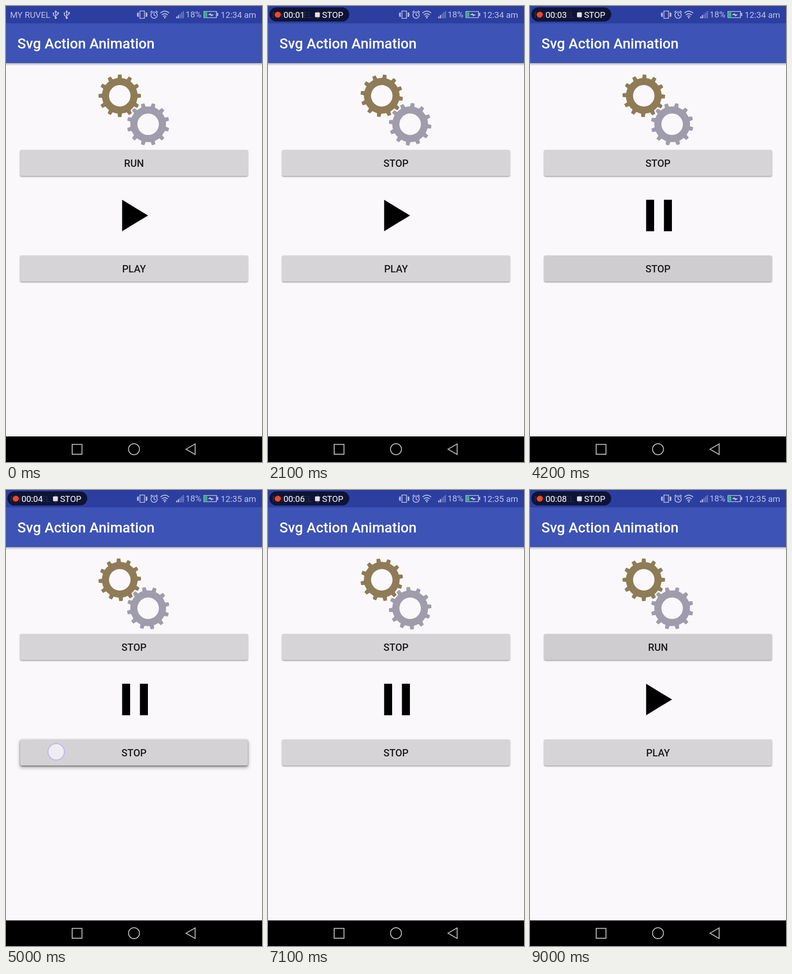
Write an HTML page that moves like this. It is 561 px wide and 998 px high and loops after 9.1 s.

```html
<!DOCTYPE html>
<html lang="en">
<head>
<meta charset="utf-8">
<title>Svg Action Animation</title>
<style>
html, body { margin: 0; width: 100%; height: 100%; overflow: hidden; background: #faf8fb; }
svg { display: block; width: 561px; height: 998px; font: 18.7px Roboto, sans-serif; }
.medium { font-weight: 500; }
.label { font-size: 21.8px; font-weight: 500; text-anchor: middle; fill: #1b1b1d; }
.line { fill: none; stroke: #bcc3e6; stroke-width: 1.7; }
.nav { fill: none; stroke: #bdbdbd; stroke-width: 2; }
</style>
</head>
<body>
<svg viewBox="0 0 561 998">
  <defs>
    <filter id="blur" x="-5%" y="-40%" width="110%" height="180%"><feGaussianBlur stdDeviation="1.4"/></filter>
    <filter id="softBlur" x="-5%" y="-40%" width="110%" height="180%"><feGaussianBlur stdDeviation="4"/></filter>
    <linearGradient id="barShadow" x2="0" y2="1">
      <stop stop-color="#000" stop-opacity=".26"/>
      <stop offset="1" stop-color="#000" stop-opacity="0"/>
    </linearGradient>
    <g id="usb">
      <path class="line" d="M0 8V-6M0 5L-5 1V-3M0 2L5-1V-4"/>
      <path d="M-3-5L0-10L3-5Z"/><circle cy="7" r="2.4"/>
      <circle cx="-5" cy="-3" r="1.8"/><path d="M3.4-5.5h3.4v3.4h-3.4z"/>
    </g>
  </defs>

  <rect width="561" height="998" fill="#faf8fb"/>
  <rect y="125" width="561" height="6" fill="url(#barShadow)"/>
  <rect y="37" width="561" height="88" fill="#3d53b6"/>
  <rect width="561" height="38" fill="#2c3fa0"/>
  <text class="medium" x="25" y="93" font-size="31.2" fill="#fff">Svg Action Animation</text>

  <g fill="#bcc3e6">
    <text x="9" y="26">MY RUVEL</text>
    <use href="#usb" x="109" y="19"/>
    <use href="#usb" x="133" y="19"/>
    <path class="line" d="M293.500 11h10v16h-10zM290 14v10M307 14v10M287.500 15l1.500 2-1.500 2 1.500 2-1.500 2M309.500 15l-1.500 2 1.500 2-1.500 2 1.500 2"/>
    <circle class="line" cx="324.500" cy="20" r="7"/>
    <path class="line" d="M324.500 15v5l3.500 2M316.500 14l4-3.500M332.500 14l-4-3.500"/>
    <path class="line" d="M338.500 15.500q9.500-8.500 19 0M341.500 19.500q6.500-5.500 13 0M344.500 23q3.500-3 7 0"/>
    <circle cx="348" cy="25.500" r="1.700"/>
    <path d="M373 23h2.400v4h-2.400zM376.700 20h2.400v7h-2.400z"/>
    <path opacity=".45" d="M380.400 17h2.400v10h-2.400zM384 14h2.400v13h-2.400zM387.500 11h2.400v16h-2.400z"/>
    <text x="393.500" y="25">18%</text>
    <path class="line" d="M433.800 12h27.400v13.500h-27.400z"/>
    <path d="M435.500 13.500h5.500v10.500h-5.500z" fill="#25c46a"/>
    <path d="M442 19l7-3.500v2.500l7 1-7 4v-2.500z"/>
    <path d="M462.500 15h2.500v7h-2.500z"/>
    <text id="clock" x="470.500" y="26"></text>
  </g>

  <g id="recorder">
    <rect x="3" y="3" width="175" height="31" rx="15.500" fill="#080c20" fill-opacity=".82"/>
    <circle id="dot" cx="21.500" cy="19" r="6.500" fill="#ff4420"/>
    <g fill="#fff">
      <text id="timer" x="34" y="26"></text>
      <rect x="103" y="14" width="10.500" height="10.500" rx="1.500" fill="#e0e0e6"/>
      <text x="118.500" y="26">STOP</text>
    </g>
  </g>

  <g id="gears"></g>
  <path id="icon"/>
  <g id="buttons"></g>
  <circle id="touch" cx="110" r="18" fill="#f1f0f6" fill-opacity=".92" stroke="#b9b9dc" stroke-width="2"/>

  <rect y="942" width="561" height="56"/>
  <g class="nav">
    <rect x="145" y="959.500" width="21.500" height="21.500"/>
    <circle cx="280.500" cy="970" r="12"/>
    <path d="M394.500 970L414.500 958.500V981.500Z"/>
  </g>
</svg>
<script>
const LOOP = 9100, STEP = 100, SECOND = 1060, SPIN = 0.0684;
const $ = id => document.getElementById(id);
const clamp = x => Math.max(0, Math.min(1, x));

// Each tap is [press, release]; a release toggles the button.
const buttons = [
  { y: 315, off: 'RUN', taps: [[900, 1500], [8350, 8700]] },
  { y: 546, off: 'PLAY', taps: [[3500, 3900], [4700, 5100], [6000, 6400], [7500, 7900]] }
];

for (const b of buttons) {
  const box = (dy, attrs) => `<rect x="31" y="${b.y + dy}" width="499" height="57" rx="3" ${attrs}/>`;
  const group = document.createElementNS('http://www.w3.org/2000/svg', 'g');
  group.innerHTML = box(4, 'filter="url(#softBlur)" opacity="0"')
    + box(1.5, 'filter="url(#blur)" opacity=".42"')
    + box(0, 'fill="#d7d4d7"') + box(0, 'opacity="0"')
    + `<text class="label" x="280.5" y="${b.y + 36.5}"></text>`;
  $('buttons').append(group);
  b.lift = group.children[0];
  b.ripple = group.children[3];
  b.label = group.children[4];
}

function gear(x, y, color, phase) {
  let teeth = '';
  for (let i = 0; i < 12; i++)
    teeth += `<path d="M-5-37L-3.800-46.500H3.800L5-37Z" transform="rotate(${i * 30 + phase})"/>`;
  return `<g transform="translate(${x} ${y})"><g fill="${color}">${teeth}
    <circle r="31.300" fill="none" stroke="${color}" stroke-width="15.600"/></g></g>`;
}
$('gears').innerHTML = gear(249.3, 196.5, '#8f7c56', 0) + gear(311.5, 258.8, '#9f9cab', 15);
const wheels = [...$('gears').children].map(g => g.firstElementChild);

// Two quads per icon, mixed point by point.
const play = [[254.5, 424, 283, 441.5, 283, 475.5, 254.5, 493],
              [282.5, 441.2, 311, 458.3, 311, 458.7, 282.5, 475.8]];
const pause = [[254.5, 424, 272, 424, 272, 493, 254.5, 493],
               [293.5, 424, 311, 424, 311, 493, 293.5, 493]];
const morph = k => play.map((quad, i) =>
  'M' + quad.map((v, j) => v + (pause[i][j] - v) * k).join(' ') + 'Z').join('');

function drawButton(b, t) {
  const done = b.taps.filter(tap => t >= tap[1]);
  const held = b.taps.find(([down, up]) => t >= down && t < up);
  const on = done.length % 2 === 1;
  const since = done.length ? t - done[done.length - 1][1] : Infinity;
  b.label.textContent = on ? 'STOP' : b.off;
  b.lift.setAttribute('opacity', 0.36 * (held ? clamp((t - held[0]) / 200) : clamp(1 - since / 200)));
  b.ripple.setAttribute('opacity', held ? 0.008 : 0.06 * clamp(1 - since / 600));
  return { on, since, held };
}

function draw(t) {
  const [run, player] = buttons.map(b => drawButton(b, t));
  const angle = run.on ? Math.max(0, t - 1540) * SPIN : 0;
  wheels.forEach((w, i) => w.setAttribute('transform', `rotate(${i ? -angle : angle})`));

  const k = clamp(player.since / 200);
  $('icon').setAttribute('d', morph(player.on ? k : 1 - k));

  const touched = run.held ? buttons[0] : player.held && buttons[1];
  $('touch').setAttribute('visibility', touched ? 'visible' : 'hidden');
  if (touched) $('touch').setAttribute('cy', touched.y + 27);

  const ticks = t / SECOND;
  $('recorder').setAttribute('visibility', t < 100 ? 'hidden' : 'visible');
  $('dot').setAttribute('opacity', ticks % 1 > 0.48 ? 1 : 0);
  $('timer').textContent = '00:0' + Math.floor(ticks);
  $('clock').textContent = t < 5000 ? '12:34 am' : '12:35 am';
}

function frame() {
  draw(Math.floor(performance.now() % LOOP / STEP) * STEP);
  requestAnimationFrame(frame);
}
frame();
</script>
</body>
</html>
```
